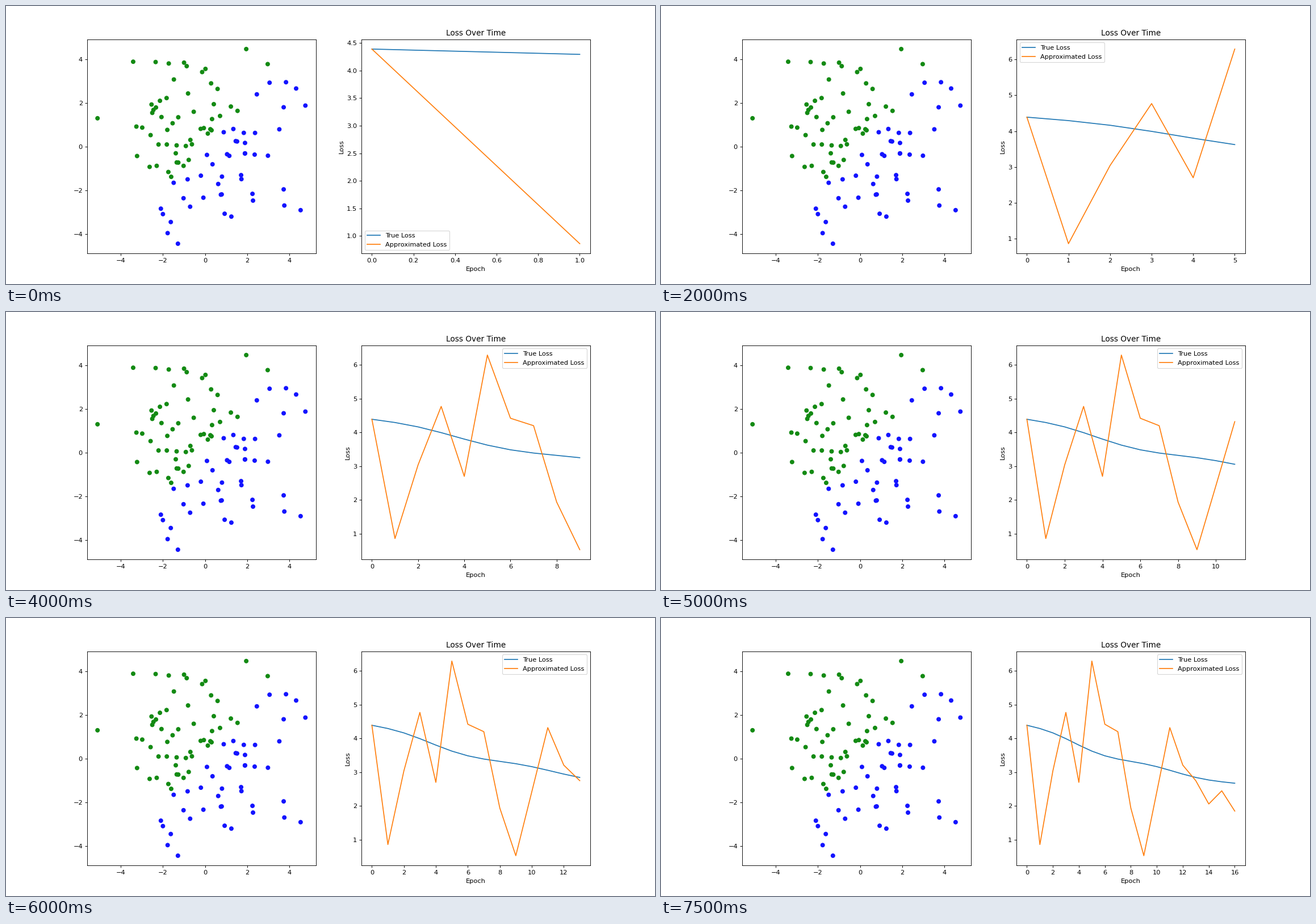
A matplotlib script that plays this animation: 1143 by 490 pixels, repeating every 8000 ms.

```python
import numpy as np
import matplotlib.pyplot as plt
from matplotlib.animation import FuncAnimation

EPOCHS = 17
STEP_MS = 500

# Turning values of the noisy estimate, one per epoch
APPROX_LOSS = [4.39, 0.86, 3.04, 4.77, 2.70, 6.29, 4.42, 4.20, 1.94,
               0.53, 2.42, 4.32, 3.21, 2.75, 2.06, 2.45, 1.85]


def true_loss(t):
    """Slowing descent with a fading ripple."""
    ripple = 0.09 * (1 - t / 20) * np.sin(np.pi * t / 4)
    return 4.39 - 0.16 * t + 0.0033 * t**2 + ripple


# 1143 x 490 pixels
fig, (points_ax, loss_ax) = plt.subplots(1, 2, figsize=(14, 6.002), dpi=81.65)

# Two classes split by the diagonal
points = 2 * np.random.RandomState(0).randn(100, 2)
colors = np.where(points[:, 1] > points[:, 0], "#138a13", "#1313ff")
points_ax.scatter(points[:, 0], points[:, 1], c=colors)


def draw(frame):
    epochs = np.arange(frame + 2)
    loss_ax.clear()
    loss_ax.plot(epochs, true_loss(epochs), label="True Loss")
    loss_ax.plot(epochs, APPROX_LOSS[:len(epochs)], label="Approximated Loss")
    loss_ax.set_title("Loss Over Time")
    loss_ax.set_xlabel("Epoch")
    loss_ax.set_ylabel("Loss")
    loss_ax.legend()


anim = FuncAnimation(fig, draw, frames=EPOCHS - 1, init_func=lambda: None,
                     interval=STEP_MS, repeat=True, repeat_delay=0)

plt.show()
```
